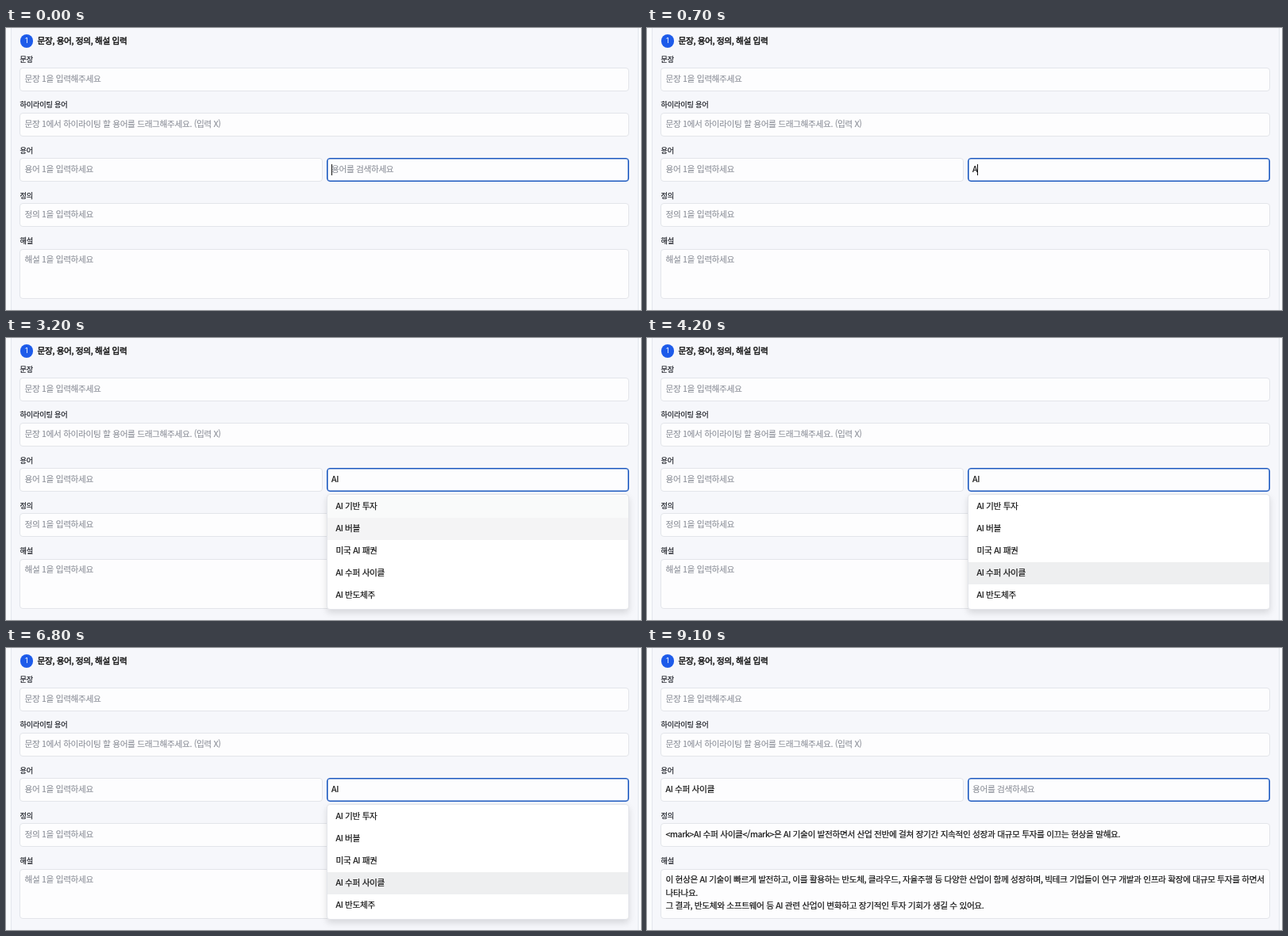
Recreate the animation shown at these times as an HTML page. Size 800x356 px, loop 9200 ms.

```html
<!DOCTYPE html>
<html lang="ko">
<head>
<meta charset="utf-8">
<style>
html, body { margin: 0; width: 100%; height: 100%; overflow: hidden; background: #fafbfd; }
#stage { position: relative; width: 800px; height: 356px; overflow: hidden;
  font: 10.7px "Noto Sans CJK KR", "Noto Sans CJK", "Noto Sans", sans-serif; letter-spacing: -.37px; color: #111; }
#stage div { position: absolute; box-sizing: border-box; white-space: pre; }
#card { left: 6px; top: -10px; width: 791px; height: 380px; background: #f6f7fb; border: 1px solid #e3e6ed; }
#badge { left: 17.5px; top: 8.2px; width: 16.5px; height: 16.5px; border-radius: 50%; background: #1d5bea; color: #fff;
  font: 9px/16.5px Inter, sans-serif; text-align: center; }
#title { left: 39.5px; top: 5.5px; line-height: 20px; -webkit-text-stroke: .4px; }
.label { left: 17.5px; font-size: 9.2px; line-height: 14px; letter-spacing: -.22px; color: #1c1f26; -webkit-text-stroke: .2px; }
.field { background: #fdfdfe; border: 1px solid #e3e5ea; border-radius: 4px; padding-left: 5.5px; line-height: 26.6px;
  -webkit-text-stroke: .2px; }
.empty { color: #8b8f98; -webkit-text-stroke: .1px; }
#search { border-color: #1c59c0; box-shadow: inset 0 0 0 .6px #1c59c0; }
#caret { top: 172px; width: 1px; height: 14px; background: #111; }
#menu { left: 404px; top: 196.5px; width: 381px; background: #fff; border: 1px solid #e3e5ea; border-radius: 4px;
  box-shadow: 0 4px 8px rgba(0,0,0,.13); -webkit-text-stroke: .2px; }
#menu div { left: 0; width: 379px; height: 27.9px; padding-left: 10.6px; line-height: 26.8px; }
</style>
</head>
<body>
<div id="stage"><div id="card"></div><div id="badge">1</div><div id="title">문장, 용어, 정의, 해설 입력</div></div>
<script>
const LOOP = 9200, TYPE_A = 600, TYPE_I = 1000, FILTER = 1900, PICK = 8100;
const BLINKS = [1000, 1500, 1900, 2400, 2900, 3400, 3900, 4500, 4900, 5300, 5700, 6200, 6500, 7000, 7400, 7900, 8700];
const HOVERS = [2880, 3100, 3290, 3450];
const ROW = 27.9, FADE = 150;
const ALL = ['AI 기반 투자', 'ISA', '단기자금시장형 수시입출금식 예금(MMDA)', 'CMA', 'AI 버블', '미국 AI 패권'];
const MATCHES = ['AI 기반 투자', 'AI 버블', '미국 AI 패권', 'AI 수퍼 사이클', 'AI 반도체주'];
const TERM = 'AI 수퍼 사이클';
const DEFINITION = `<mark>${TERM}</mark>은 AI 기술이 발전하면서 산업 전반에 걸쳐 장기간 지속적인 성장과 대규모 투자를 이끄는 현상을 말해요.`;
const COMMENTARY = `이 현상은 AI 기술이 빠르게 발전하고, 이를 활용하는 반도체, 클라우드, 자율주행 등 다양한 산업이 함께 성장하며, 빅테크 기업들이 연구 개발과 인프라 확장에 대규모 투자를 하면서
나타나요.
그 결과, 반도체와 소프트웨어 등 AI 관련 산업이 변화하고 장기적인 투자 기회가 생길 수 있어요.`;

const stage = document.getElementById('stage');

function add(parent, style, props) {
  const el = Object.assign(document.createElement('div'), props);
  for (const key in style) el.style[key] = style[key] + 'px';
  return parent.appendChild(el);
}

function field(x, y, w, h, hint, id = '') {
  const el = add(stage, { left: x, top: y, width: w, height: h }, { className: 'field', id });
  return value => {
    el.textContent = value || hint;
    el.classList.toggle('empty', !value);
  };
}

['문장', '하이라이팅 용어', '용어', '정의', '해설'].forEach((text, i) =>
  add(stage, { top: 32.3 + 57.1 * i }, { className: 'label', textContent: text }));

field(17, 50, 768, 30, '문장 1을 입력해주세요')('');
field(17, 107, 768, 30, '문장 1에서 하이라이팅 할 용어를 드래그해주세요. (입력 X)')('');
const setTerm = field(17, 164, 382, 30, '용어 1을 입력하세요');
const setSearch = field(403.5, 164, 381.5, 30, '용어를 검색하세요', 'search');
const setDefinition = field(17, 221, 768, 30, '정의 1을 입력하세요');
const setCommentary = field(17, 278.5, 768, 63, '해설 1을 입력하세요');
const commentary = stage.lastChild;
commentary.style.lineHeight = '16.5px';
commentary.style.paddingTop = '4.5px';

const caret = add(stage, {}, { id: 'caret' });
const menu = add(stage, {}, { id: 'menu' });
const rows = ALL.map((_, i) => add(menu, { top: 1.6 + ROW * i }));

const clamp = v => Math.max(0, Math.min(1, v));

function hoverLevel(i, t) {
  const rise = clamp((t - HOVERS[i]) / FADE) || 0;
  const fall = clamp((t - HOVERS[i + 1]) / FADE) || 0;
  return rise - fall;
}

function render(t) {
  const picked = t >= PICK;
  const query = picked || t < TYPE_A ? '' : t < TYPE_I ? 'A' : 'AI';
  setTerm(picked ? TERM : '');
  setSearch(query);
  setDefinition(picked ? DEFINITION : '');
  setCommentary(picked ? COMMENTARY : '');

  caret.style.left = [410, 416.4, 419][query.length] + 'px';
  caret.style.opacity = BLINKS.filter(b => b <= t).length % 2 ? 0 : 1;

  const items = t < FILTER ? ALL : MATCHES;
  menu.style.display = query.length === 2 ? 'block' : 'none';
  menu.style.height = (t < FILTER ? 200 : 146) + 'px';
  rows.forEach((row, i) => {
    row.textContent = items[i] || '';
    row.style.background = `rgba(100,105,115,${0.105 * hoverLevel(i, t)})`;
  });
}

function tick() {
  render(performance.now() % LOOP);
  requestAnimationFrame(tick);
}
tick();
</script>
</body>
</html>
```
